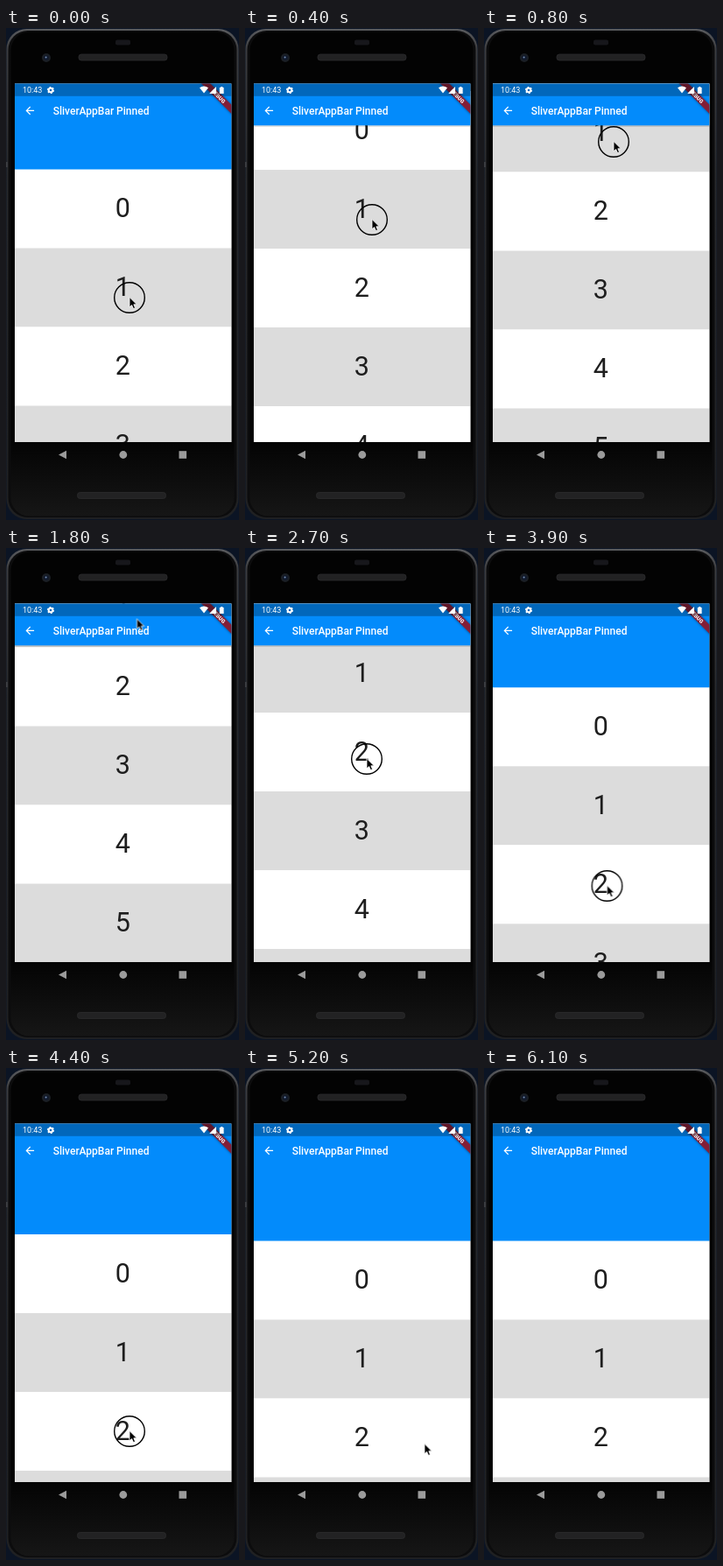
These frames come from a looping animation (266 by 562 pixels, 6.2 s). An HTML page:

```html
<!DOCTYPE html>
<html lang="en">
<head>
<meta charset="utf-8">
<title>Pinned app bar</title>
<style>
  @property --y { syntax: "<number>"; inherits: true; initial-value: 161.5; }

  html, body { margin: 0; width: 100%; height: 100%; overflow: hidden; background: #0b1424; }
  svg { display: block; width: 266px; height: 562px; font-family: Roboto, sans-serif; }

  /* --y is the top of row 0; the bar shrinks with it down to its pinned height */
  #phone { animation: scroll 6.2s infinite; }
  #rows { transform: translateY(calc(var(--y) * 1px)); }
  #bar { height: calc(max(var(--y), 111.3) * 1px - 63px); }
  #shade { opacity: clamp(0, (111 - var(--y)) / 12, 1); }
  #pointer { animation: move 6.2s infinite; }
  #ring { animation: press 6.2s step-end infinite; }
  #rows text { font-size: 30.5px; fill: #1e1e1e; text-anchor: middle; }

  @keyframes scroll {
    0%       { --y: 161.5; animation-timing-function: steps(4); }
    6.4516%  { --y: 72;    animation-timing-function: steps(4); }
    12.9032% { --y: -15.5; animation-timing-function: steps(3); }
    17.7419% { --y: -55;   animation-timing-function: steps(3); }
    22.5806% { --y: -66.5; animation-timing-function: step-end; }
    37.0967% { --y: -66.5; animation-timing-function: steps(4); }
    43.5483% { --y: 8;     animation-timing-function: steps(4); }
    50%      { --y: 87;    animation-timing-function: steps(4); }
    56.4516% { --y: 129;   animation-timing-function: steps(4); }
    62.9032% { --y: 159.3; animation-timing-function: steps(5); }
    70.9677% { --y: 190;   animation-timing-function: steps(3); }
    75.8064%, 100% { --y: 197.5; }
  }
  @keyframes move {
    0%       { transform: translate(141px, 308px);   animation-timing-function: steps(4); }
    6.4516%  { transform: translate(145px, 219px);   animation-timing-function: steps(4); }
    12.9032% { transform: translate(148px, 130px);   animation-timing-function: steps(3); }
    17.7419% { transform: translate(149px, 93px);    animation-timing-function: steps(3); }
    22.5806% { transform: translate(149.5px, 81.5px); animation-timing-function: step-end; }
    29.0322% { transform: translate(149.5px, 81.5px); animation-timing-function: steps(5); }
    37.0967% { transform: translate(139px, 168px);   animation-timing-function: steps(4); }
    43.5483% { transform: translate(139px, 241px);   animation-timing-function: steps(4); }
    50%      { transform: translate(139.2px, 318px); animation-timing-function: steps(4); }
    56.4516% { transform: translate(140px, 358px);   animation-timing-function: steps(4); }
    62.9032% { transform: translate(140.5px, 386px); animation-timing-function: steps(5); }
    70.9677% { transform: translate(141px, 415px);   animation-timing-function: steps(3); }
    75.8064% { transform: translate(141.5px, 423px); animation-timing-function: step-end; }
    80.6451% { transform: translate(141.5px, 423px); animation-timing-function: steps(5); }
    88.7096%, 100% { transform: translate(300px, 440px); }
  }
  @keyframes press {
    0%       { opacity: 1; }
    22.5806% { opacity: 0; }
    37.0967% { opacity: 1; }
    77.4193%, 100% { opacity: 0; }
  }
</style>
</head>
<body>
<svg id="phone" viewBox="0 0 266 562">
  <defs>
    <clipPath id="screen"><rect x="10" y="63.5" width="247.3" height="409.5"/></clipPath>
    <filter id="soft" x="-20%" y="-60%" width="140%" height="220%"><feGaussianBlur stdDeviation="1.5"/></filter>
    <linearGradient id="rim" x2="0" y2="1">
      <stop stop-color="#5a5b5e"/>
      <stop offset=".04" stop-color="#3c3d40"/>
      <stop offset=".3" stop-color="#28292b"/>
      <stop offset="1" stop-color="#1f2022"/>
    </linearGradient>
    <linearGradient id="glass" x2="0" y2="1">
      <stop offset=".84" stop-color="#030303"/>
      <stop offset="1" stop-color="#161616"/>
    </linearGradient>
  </defs>

  <!-- device -->
  <rect x=".5" y="1" width="265" height="560" rx="23" fill="url(#rim)"/>
  <rect x="2.6" y="3" width="260.8" height="556" rx="22" fill="#0c0c0d"/>
  <rect x="5.5" y="4.5" width="255" height="553" rx="21" fill="url(#glass)"/>
  <rect y="153" width="2" height="6" fill="#3a3c40"/>
  <rect x="125" y="13.5" width="17" height="6" rx="2" fill="#17171b"/>
  <g fill="#222223" stroke="#2d2d2e" stroke-width=".8">
    <rect x="83" y="30" width="101" height="7" rx="3"/>
    <rect x="81.5" y="530.5" width="101" height="7" rx="3"/>
  </g>
  <circle cx="46" cy="34" r="5" fill="#1b1f25"/>
  <circle cx="46" cy="34" r="2.8" fill="#101a2e"/>
  <circle cx="45.6" cy="33.6" r="1" fill="#7890b4"/>

  <g clip-path="url(#screen)">
    <rect x="10" y="63" width="248" height="411" fill="#fff"/>
    <g id="rows"></g>
    <rect id="shade" x="10" y="111.3" width="248" height="1.3" fill="#000" fill-opacity=".2"/>
    <rect id="bar" x="10" y="63" width="248" fill="#038bfb"/>
    <g fill="#fff">
      <path transform="translate(20.1 87.2) scale(.6)"
        d="M20 11H7.83l5.59-5.59L12 4l-8 8 8 8 1.41-1.41L7.83 13H20z"/>
      <text x="53.7" y="98.6" font-size="12" font-weight="500">SliverAppBar Pinned</text>
    </g>

    <g transform="translate(257 63.5) rotate(45)">
      <rect x="-26" y="16.8" width="52" height="7.2" fill="#000" opacity=".5" filter="url(#soft)"/>
      <rect x="-26" y="16.8" width="52" height="7.2" fill="#96182c" fill-opacity=".88"/>
      <text y="22.6" font-size="6.1" font-weight="900" fill="#fff" text-anchor="middle">DEBUG</text>
    </g>

    <!-- the system status bar lies over the app -->
    <rect x="10" y="63" width="248" height="14.8" fill="#000" fill-opacity=".26"/>
    <g fill="#fff">
      <text x="19" y="74.2" font-size="9">10:43</text>
      <circle cx="51" cy="71" r="2.3" fill="none" stroke="#fff" stroke-width="2"/>
      <circle cx="51" cy="71" r="3.5" fill="none" stroke="#fff" stroke-width="1.2" stroke-dasharray="1.83"/>
      <path d="M221 68.2Q226 64.6 231 68.2L226 74.5Z"/>
      <path d="M232.5 75V74.5L240 67V75Z"/>
      <path d="M243.8 68H245V67H247.4V68H248.6V75H243.8Z"/>
    </g>
  </g>

  <!-- navigation -->
  <g fill="#9b9b9b">
    <path d="M60 487.5L69 482.7V492.3Z"/>
    <circle cx="133.8" cy="487.5" r="4.4"/>
    <rect x="197.5" y="483.2" width="8.6" height="8.6"/>
  </g>

  <g id="pointer">
    <circle id="ring" r="17.3" fill="none" stroke="#000" stroke-width="1.4"/>
    <path d="M0-.5V10.8L2.6 8.5 4.5 12.6 6.5 11.7 4.8 7.8H8.3Z" fill="#000" stroke="#fff" stroke-width=".8"/>
  </g>
</svg>
<script>
  const rowHeight = 90;
  document.getElementById("rows").innerHTML = Array.from({ length: 6 }, (_, i) => {
    const top = i * rowHeight;
    return `<rect x="10" y="${top}" width="248" height="${rowHeight}" fill="${i % 2 ? "#dcdcdc" : "#fff"}"/>
      <text x="133.3" y="${top + 54.8}">${i}</text>`;
  }).join("");
</script>
</body>
</html>
```
